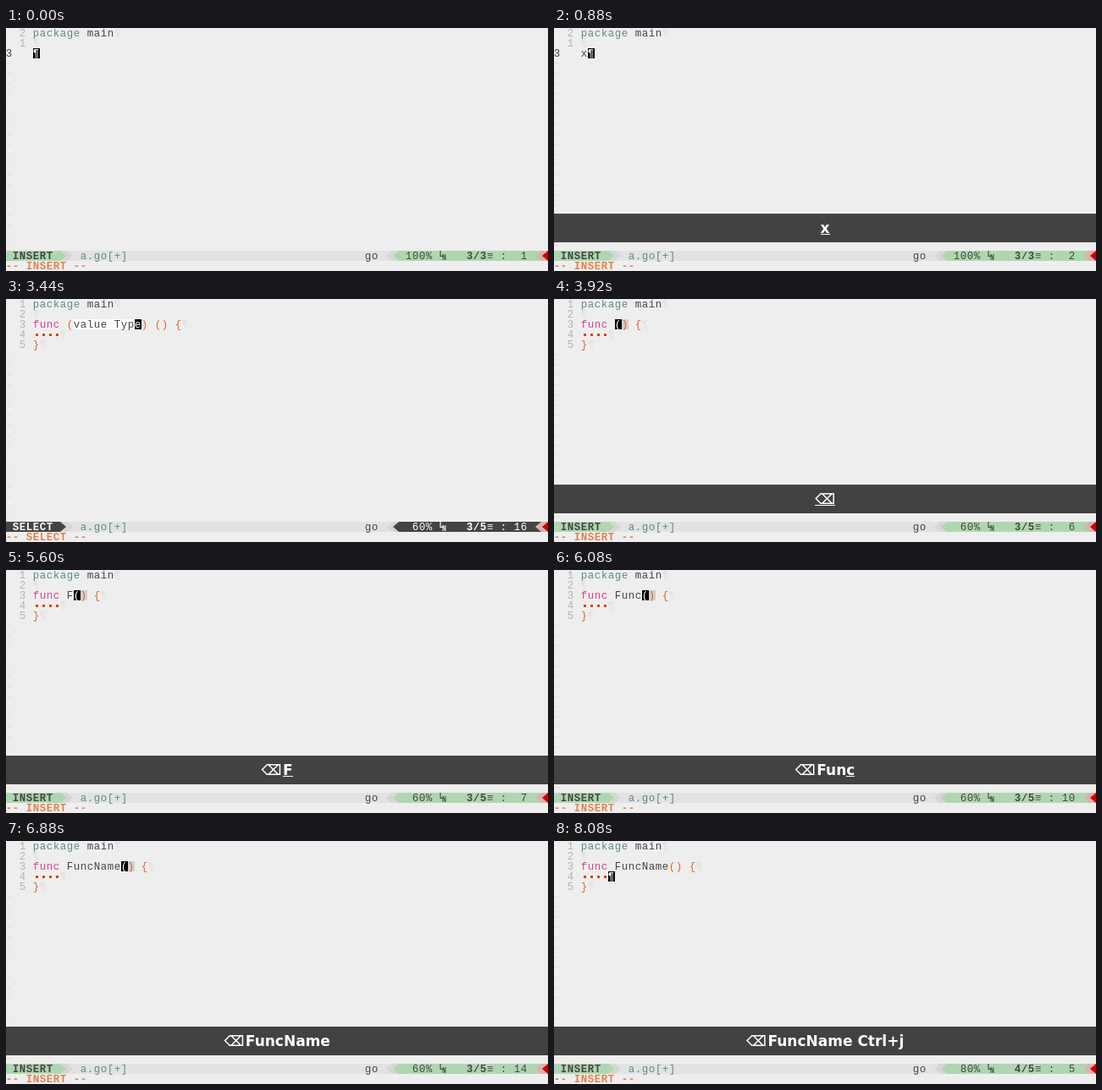
Recreate the animation shown at these times as an HTML page with a canvas. Size 640 px wide and 288 px high, loop 8.8 s.

```html
<!DOCTYPE html>
<html lang="en">
<head>
<meta charset="utf-8">
<title>Go method snippet in a terminal editor</title>
<style>
  html, body { margin: 0; width: 100%; height: 100%; overflow: hidden; background: #eee; }
  canvas { display: block; }
</style>
</head>
<body>
<canvas width="640" height="288"></canvas>
<script>
const ctx = document.querySelector('canvas').getContext('2d');
const LOOP = 8800, CW = 8, RH = 12, EXPAND = 1520, JUMP = 7760;
const MONO = '12.4px "Liberation Mono", monospace';
const KEYS = 'bold 17px "DejaVu Sans", sans-serif';
const INK = '#444', PALE = '#e0e0e0', NUM = '#b2b2b2', TEAL = '#5f8787',
      PINK = '#d7418a', ORANGE = '#e4602a', GREEN = '#afd7af', BAR = '#e2e2e2', TAB = '#d6d6d6';

const NAME = 'FuncName';
const NAME_AT = [5600, 5760, 5920, 6080, 6320, 6560, 6640, 6720];

// Key display: [time, earlier keys, newest key]
const presses = [
  [880, '', 'x'],
  [1440, 'x\u200a', '↹'],
  [3440, '', ''],
  [3920, '', '⌫'],
  ...NAME_AT.map((at, i) => [at, '⌫\u200a' + NAME.slice(0, i), NAME[i]]),
  [7680, '⌫\u200a' + NAME + ' ', 'Ctrl+j']
];

function rect(x, y, w, h, color) {
  ctx.fillStyle = color;
  ctx.fillRect(x, y, w, h);
}

// Writes text on the character grid and returns the column after it
function put(col, row, text, color, bg, bold) {
  if (bg) rect(col * CW, row * RH, text.length * CW, RH, bg);
  ctx.font = (bold ? 'bold ' : '') + MONO;
  ctx.fillStyle = color;
  ctx.textAlign = 'center';
  [...text].forEach((c, i) => ctx.fillText(c, (col + i) * CW + 3.5, row * RH + 10));
  return col + text.length;
}

const cursor = (col, row, c) => put(col, row, c, '#fff', '#000');

// Triangle separator in one cell; dir 1 points right, -1 left
function arrow(col, color, bg, dir) {
  const x = col * CW, y = 22 * RH, base = dir > 0 ? x : x + CW;
  rect(x, y, CW, RH, bg);
  ctx.fillStyle = color;
  ctx.beginPath();
  ctx.moveTo(base, y);
  ctx.lineTo(base + dir * (CW - 1), y + RH / 2);
  ctx.lineTo(base, y + RH);
  ctx.fill();
}

function drawStatus(mode, row, rows, col) {
  const select = mode === 'SELECT';
  const bg = select ? INK : GREEN, fg = select ? '#fff' : INK;
  rect(0, 264, 640, RH, BAR);
  rect(0, 264, 64, RH, bg);
  put(1, 22, mode, fg, null, true);
  arrow(8, bg, TAB, 1);
  arrow(9, TAB, BAR, 1);
  put(11, 22, 'a.go[+]', TEAL);
  put(53, 22, 'go', INK);
  arrow(56, TAB, BAR, -1);
  arrow(57, bg, TAB, -1);
  rect(464, 264, 160, RH, bg);
  put(59, 22, (row / rows * 100 + '%').padStart(4), fg);
  ctx.font = 'bold 8px "DejaVu Sans Mono", monospace';
  ctx.fillText('L', 514, 271);
  ctx.fillText('N', 517.5, 275);
  put(68, 22, row + '/' + rows, fg, null, true);
  put(71, 22, '≡ :' + String(col).padStart(3), fg);
  arrow(78, '#dfafaf', bg, -1);
  arrow(79, '#d00000', '#dfafaf', -1);
  put(0, 23, `-- ${mode} --`, '#e0804f', null, true);
}

function drawStart(typed) {
  put(2, 0, '2', NUM);
  put(2, 1, '1', NUM);
  put(0, 2, '3', INK);
  cursor(put(4, 2, typed, INK), 2, '¶');
  drawStatus('INSERT', 3, 3, 1 + typed.length);
}

function drawFunc(t) {
  const select = t < 3920, jumped = t >= JUMP;
  for (let i = 0; i < 5; i++) put(2, i, String(i + 1), NUM);
  put(4, 2, 'func', PINK);
  let col = 9;
  if (select) {
    put(9, 2, '(', ORANGE);
    put(10, 2, 'value Typ', INK, '#fff');
    cursor(19, 2, 'e');
    col = put(20, 2, ') ()', ORANGE);
  } else {
    const name = NAME.slice(0, NAME_AT.filter(at => t >= at).length);
    col = put(9, 2, name, INK);
    if (jumped) col = put(col, 2, '()', ORANGE);
    else {
      cursor(col, 2, '(');
      col = put(col + 1, 2, ')', ORANGE, '#d0d0d0');
    }
  }
  put(put(col + 1, 2, '{', ORANGE), 2, '¶', PALE);
  for (let i = 4; i < 8; i++) rect(i * CW + 3, 41, 3, 3, '#dc421a');
  if (jumped) cursor(8, 3, '¶');
  else put(8, 3, '¶', PALE);
  put(put(4, 4, '}', ORANGE), 4, '¶', PALE);
  if (select) drawStatus('SELECT', 3, 5, 16);
  else if (jumped) drawStatus('INSERT', 4, 5, 5);
  else drawStatus('INSERT', 3, 5, col - 5);
}

function drawKeys(t) {
  const press = presses.findLast(p => t >= p[0]);
  if (!press || !press[2]) return;
  const [at, before, key] = press;
  rect(0, 220, 640, 34, '#424242');
  ctx.font = KEYS;
  ctx.fillStyle = '#fff';
  ctx.textAlign = 'left';
  const all = ctx.measureText(before + key).width, w = ctx.measureText(key).width;
  const x = 320 - all / 2;
  ctx.fillText(before + key, x, 243);
  if (t < at + 160) ctx.fillRect(Math.round(x + all - w), 244, Math.round(w), 1);
}

function draw(now) {
  const t = now % LOOP, started = t < EXPAND;
  rect(0, 0, 640, 288, '#eee');
  for (let row = started ? 3 : 5; row < 22; row++) put(0, row, '~', PALE);
  put(4, 0, 'package', TEAL);
  put(put(12, 0, 'main', INK), 0, '¶', PALE);
  put(4, 1, '¶', PALE);
  if (started) drawStart(t < 880 ? '' : 'x');
  else drawFunc(t);
  drawKeys(t);
}

let origin;
function tick(now) {
  origin ??= now;
  draw(now - origin);
  requestAnimationFrame(tick);
}
requestAnimationFrame(tick);
</script>
</body>
</html>
```
